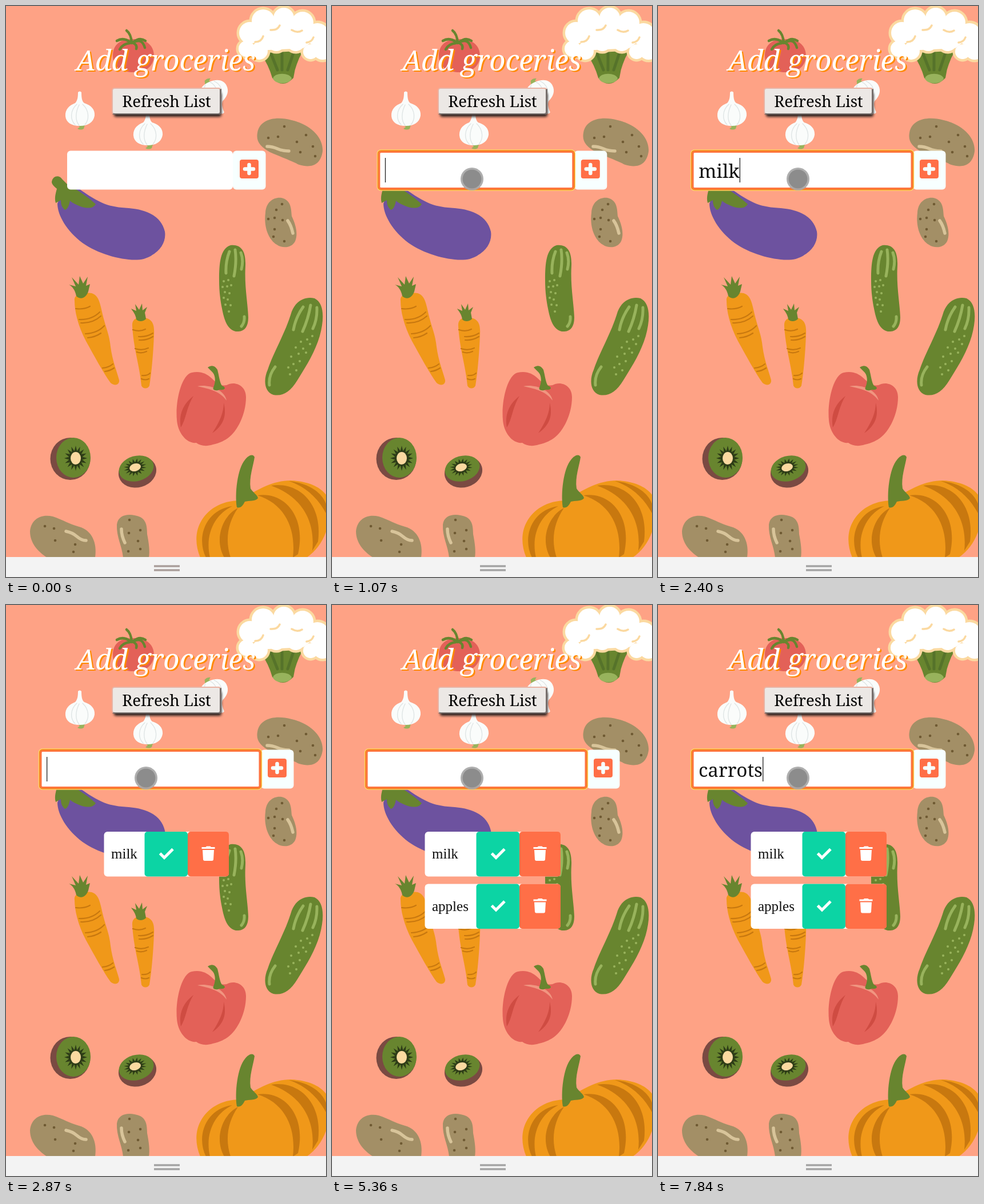
Recreate the animation shown at these times as an HTML page. Size 560 px wide and 1000 px high, loop 8 s.

```html
<!DOCTYPE html>
<html lang="en">
<head>
<meta charset="utf-8">
<title>Add groceries</title>
<style>
  html, body { margin: 0; width: 100%; height: 100%; overflow: hidden; background: #fea285; }
  svg { display: block; width: 100vw; height: 100vh; }
  .serif { font-family: "Noto Serif", serif; }
  .item { font: 25px "Liberation Serif", serif; }
  .green { fill: #68852f; }
  .lime { fill: #98b35c; }
  .orange { fill: #f09819; }
  .rust { fill: #c8780f; }
  .red { fill: #e36158; }
  .potato { fill: #a38f66; }
  .cream { fill: #fbd9a0; }
  .tomato { fill: #ff6f47; }
  .line { fill: none; stroke-linecap: round; stroke-linejoin: round; }
  .spots { stroke: #6f5a33; stroke-width: 4.5; }
  .shine { stroke: #d8c49a; stroke-width: 5.5; }
  .ridges { stroke: #c8780f; stroke-width: 2.2; }
  .stripes { stroke: #98b35c; stroke-width: 5; }
  .seeds { stroke: #98b35c; stroke-width: 4; }
</style>
</head>
<body>
<svg viewBox="0 0 560 1000" preserveAspectRatio="none">
  <defs>
    <g id="garlic">
      <path class="lime" d="M-4 20L10 18L7 28Q2 31-4 28L0 25Z"/>
      <path fill="#fafcfb" d="M-3-36Q0-39 3-36C3-26 4-20 8-17C20-13 27-6 26 5C24 17 14 23 0 23C-14 23-24 17-25 6C-26-6-18-13-8-17C-4-21-3-27-3-36Z"/>
      <path class="line" stroke="#dfe5e5" stroke-width="1.4" d="M-5-15C-17-4-17 12-8 21M5-15C17-4 17 12 9 21M-1-14C-8 0-8 14-1 22"/>
    </g>
    <g id="florets">
      <circle cx="427" cy="47" r="19"/><circle cx="421" cy="75" r="14"/><circle cx="443" cy="79" r="15"/>
      <circle cx="450" cy="26" r="20"/><circle cx="486" cy="21" r="18"/><circle cx="519" cy="29" r="19"/>
      <circle cx="545" cy="50" r="20"/><circle cx="554" cy="77" r="17"/><circle cx="533" cy="80" r="13"/>
      <circle cx="507" cy="63" r="16"/><circle cx="473" cy="63" r="16"/>
      <path d="M430 50L460 20L510 28L545 55L520 74L440 78Z"/>
    </g>
  </defs>

  <!-- Tomato -->
  <path class="red" d="M187 87C187 68 200 57 222 58C246 57 259 69 259 88C258 106 244 117 223 116C201 116 187 106 187 87Z"/>
  <path class="line" stroke="#68852f" stroke-width="4.500" d="M220 65Q219 49 211 43M218 64Q206 54 194 61M222 64Q238 55 243 73M217 65Q204 66 199 76M223 65Q230 68 228 75M223 63Q234 54 244 61"/>

  <!-- Cauliflower -->
  <path class="green" d="M444 80Q460 104 466 126Q484 146 503 126Q506 102 520 78L500 62H460Z"/>
  <path class="line" stroke="#56732a" stroke-width="5" d="M464 84L475 112M483 82V112M503 82L493 112"/>
  <path class="lime" d="M467 127C469 116 497 116 500 127C496 138 471 138 467 127Z"/>
  <use href="#florets" fill="#fbd9a0" stroke="#fbd9a0" stroke-width="9"/>
  <use href="#florets" fill="#fff"/>
  <path class="line" stroke="#fbd9a0" stroke-width="3.500" d="M436 63Q447 63 450 53M463 42Q475 43 479 34M500 42Q510 48 518 43M526 64Q535 63 538 55"/>

  <use href="#garlic" x="129" y="187"/>
  <use href="#garlic" x="248" y="221"/>
  <use href="#garlic" transform="translate(365 154) rotate(157)"/>

  <!-- Potatoes -->
  <g class="potato">
    <path d="M440 222C444 199 470 192 500 200C535 208 556 232 554 255C550 280 533 284 513 278C492 268 478 263 462 256C446 247 437 238 440 222Z"/>
    <path d="M454 362C455 342 470 334 482 336C498 340 499 352 500 368C508 385 511 400 506 412C500 424 484 425 474 418C458 408 451 385 454 362Z"/>
    <path d="M42 920C44 898 62 889 82 894C100 900 110 907 128 912C150 918 160 940 156 966H72C55 955 42 940 42 920Z"/>
    <path d="M194 908C196 892 212 889 225 892C243 895 247 905 247 925C250 940 252 955 250 966H205C203 945 193 930 194 908Z"/>
  </g>
  <path class="line shine" d="M457 246Q466 246 475 250T495 254M493 376Q499 384 502 398M105 920Q116 922 124 929T140 936M202 916Q202 928 208 940"/>
  <path class="line spots" d="M487 211h.1M476 229h.1M459 231h.1M509 238h.1M525 226h.1M515 256h.1M537 246h.1M541 263h.1M483 347h.1M473 357h.1M459 373h.1M470 371h.1M484 375h.1M470 391h.1M487 412h.1M468 404h.1M68 911h.1M84 915h.1M86 936h.1M121 943h.1M118 956h.1M216 900h.1M235 918h.1M215 923h.1M231 937h.1M235 951h.1M214 955h.1"/>

  <!-- Eggplant -->
  <path fill="#6d529f" d="M90 346C90 366 106 394 134 415C165 437 215 449 241 443C268 434 281 415 278 395C272 370 250 357 215 354C180 352 165 347 125 318L100 318Z"/>
  <path class="green" d="M80 308C82 296 94 296 98 303L107 312C125 322 140 332 157 347C153 354 145 355 133 352C122 348 115 344 112 341C110 350 108 356 103 357C97 352 96 346 96 340L87 345C84 335 88 325 89 320C84 316 80 312 80 308Z"/>

  <!-- Carrots -->
  <path class="orange" d="M120 516C118 505 135 500 150 503C162 507 164 518 169 540C174 562 181 575 183 597C186 620 193 637 198 655C199 664 190 666 183 660C170 642 154 612 140 587C126 560 120 535 120 516ZM221 560C220 548 230 544 242 546C256 548 260 557 259 575C258 605 255 640 251 665C248 671 240 671 237 665C234 630 223 600 221 560Z"/>
  <path class="green" d="M123 508C121 497 115 490 110 488L122 491L115 475L127 488L129 473L135 486L143 474L140 490L147 487L144 500C140 512 130 515 123 508ZM228 549C227 540 222 535 219 530L228 534L226 522L233 532L238 521L239 533L247 527L243 537L245 548C240 553 232 553 228 549Z"/>
  <path class="line ridges" d="M122 530Q136 532 147 526M128 549Q150 550 164 536M131 555Q152 556 166 543M139 574Q160 573 172 560M143 581Q156 580 166 573M169 634Q180 633 187 627M173 640Q182 639 189 634M222 567Q234 571 244 566M232 579Q246 580 257 573M233 585Q246 586 257 579M226 600Q238 604 249 599M229 606Q237 609 246 605M238 647Q247 648 252 643M237 653Q244 656 250 653"/>

  <!-- Cucumbers -->
  <path class="green" d="M373 480C373 450 375 425 393 419C412 417 420 430 419 455C417 490 423 520 424 545C424 565 415 571 402 570C385 566 381 545 377 525C374 508 373 495 373 480ZM500 535C508 515 525 508 540 512C556 520 558 545 549 578C541 605 527 628 512 652C498 676 485 684 468 681C452 676 450 655 458 637C470 602 488 575 500 535Z"/>
  <path class="line stripes" d="M391 430Q384 448 385 468M401 427Q404 448 399 473M411 432Q416 445 412 461M417 544Q418 554 412 561M520 527Q507 545 503 567M533 524Q529 548 519 570M544 528Q545 548 537 565M471 632Q459 647 461 664"/>
  <path class="line seeds" d="M381 482h.1M389 480h.1M379 492h.1M387 491h.1M394 489h.1M383 501h.1M391 503h.1M381 511h.1M388 514h.1M384 523h.1M393 524h.1M390 535h.1M536 578h.1M527 584h.1M516 588h.1M532 592h.1M507 598h.1M520 600h.1M512 609h.1M525 607h.1M499 614h.1M514 622h.1M503 627h.1M494 633h.1M508 638h.1M497 645h.1"/>

  <!-- Pepper -->
  <path class="red" d="M299 725C296 692 307 646 325 642C340 639 350 643 360 652C368 660 374 666 386 664C400 656 420 664 420 685C420 715 405 745 388 757C378 764 370 766 362 768C350 772 340 770 333 765C318 767 301 750 299 725Z"/>
  <path fill="#f19580" d="M335 666C352 662 382 670 386 691C375 676 360 671 335 666Z"/>
  <path fill="#cf4c42" d="M306 738C302 715 310 697 328 683C315 705 316 722 306 738ZM361 748C374 728 381 712 381 695C387 718 380 735 361 748Z"/>
  <path class="green" d="M353 633C360 628 366 630 370 637C373 648 374 660 378 665C386 668 384 673 374 672C366 675 361 672 363 668C368 656 366 645 360 640Z"/>

  <!-- Kiwis -->
  <g fill="#7a4a42">
    <ellipse cx="112.500" cy="793" rx="35" ry="37"/>
    <ellipse cx="230" cy="816" rx="33.500" ry="27" transform="rotate(-16 230 816)"/>
  </g>
  <g class="green">
    <ellipse cx="118" cy="791" rx="30" ry="35"/>
    <ellipse cx="228" cy="810" rx="31" ry="22" transform="rotate(-16 228 810)"/>
  </g>
  <g class="kiwi" transform="translate(122 792)"></g>
  <g class="kiwi" transform="translate(226 808) rotate(74) scale(.75 .92)"></g>

  <!-- Pumpkin -->
  <path class="orange" d="M340 966C331 945 331 922 340 905C352 882 376 866 410 866C440 846 468 831 498 831C528 832 550 842 560 856V921C553 940 542 955 526 966Z"/>
  <path class="rust" d="M350 966C332 930 350 882 396 876C368 889 347 922 357 966ZM382 966C364 935 378 893 406 879C388 905 383 935 393 966ZM440 857C488 850 526 895 511 960L502 966C508 915 488 872 440 857ZM464 840C512 832 555 872 546 938L536 954C542 900 515 858 464 840ZM495 832C528 835 555 852 561 875V890C546 862 525 842 495 832Z"/>
  <path class="green" d="M404 878C400 855 405 810 418 795C425 786 432 784 435 790C433 805 425 825 428 845C432 852 440 856 441 862C436 868 425 866 418 868C414 876 410 880 404 878Z"/>

  <rect y="965" width="560" height="35" fill="#f3f3f3"/>
  <path id="handle" stroke-width="3.500" d="M259 981H304M259 988H304"/>

  <!-- Header -->
  <g class="serif" text-anchor="middle">
    <g font-size="49.200" font-style="italic">
      <text x="282" y="115" fill="#ff8a00">Add groceries</text>
      <text x="279.500" y="112.500" fill="#fff">Add groceries</text>
    </g>
    <rect x="189" y="152" width="188" height="42" rx="4" fill="#2b2220" style="filter:blur(2.2px)"/>
    <rect x="185" y="143" width="192" height="47" rx="5" fill="#e9b3a4"/>
    <path fill="#776f6c" d="M377 145V186Q377 190 373 190H186L189 187H374V146Z"/>
    <rect x="187" y="145" width="187" height="43" rx="3" fill="#ece8e5"/>
    <text x="281" y="177" font-size="27.500">Refresh List</text>
  </g>

  <!-- Form -->
  <g id="add">
    <rect y="253.500" width="57.500" height="68" rx="6" fill="#f7ffff"/>
    <rect class="tomato" x="12" y="269" width="33" height="33" rx="4"/>
    <path class="line" stroke="#f7ffff" stroke-width="6.500" d="M28.500 278V293M21 285.500H36"/>
  </g>
  <rect id="field" y="253.500" height="68" rx="6" fill="#fff"/>
  <g id="focus" fill="none">
    <rect class="ring" data-inset="2" stroke="#ff7440" stroke-width="3"/>
    <rect class="ring" data-inset="-.300" stroke="#f58220" stroke-width="2.400"/>
    <rect class="ring" data-inset="-1.700" stroke="#ffd968" stroke-width="1.200"/>
    <text id="typed" class="serif" y="301" font-size="33.200" fill="#111"></text>
    <rect id="caret" y="266" width="1.300" height="43" fill="#222"/>
    <circle cx="245" cy="303" r="20" fill="#a8a8a8" fill-opacity=".92"/>
    <circle cx="245" cy="303" r="16.500" fill="#8c8c8c"/>
  </g>

  <g id="oneItem"></g>
  <g id="twoItems"></g>
</svg>

<script>
const $ = id => document.getElementById(id);
const LOOP = 8000, FOCUS = 920, GROW = 500;
const entries = [
  { word: 'milk', keys: [1850, 2030, 2210, 2400], enter: 2870 },
  { word: 'apples', keys: [3420, 3720, 3890, 4200, 4400, 4590], enter: 5360 },
  { word: 'carrots', keys: [6290, 6600, 6910, 7060, 7210, 7530, 7840], enter: LOOP }
];
const allKeys = entries.flatMap(e => e.keys);

function kiwiCore() {
  const points = Array.from({ length: 32 }, (_, i) => {
    const r = i % 2 ? 13 : 22, a = i * Math.PI / 16;
    return [r * .92 * Math.cos(a), r * Math.sin(a)].map(v => v.toFixed(1));
  });
  return `<polygon points="${points.join(' ')}" fill="#2e3d17"/><ellipse class="cream" rx="9" ry="11"/>`;
}

function itemRow(x, y, labelWidth, label) {
  return `<g transform="translate(${x} ${y})">
    <rect width="${labelWidth + 147.5}" height="78.500" rx="6" fill="#fff"/>
    <text class="item" x="12.500" y="47" fill="#111">${label}</text>
    <g transform="translate(${labelWidth} 0)">
      <rect width="75.500" height="78.500" rx="5" fill="#0cd4a4"/>
      <path fill="none" stroke="#fff" stroke-width="5" d="M27 38L34.500 45.500L49.500 30.500"/>
      <rect class="tomato" x="75.500" width="72" height="78.500" rx="5"/>
      <path fill="#fff" d="M100 27H107L108.500 25.500H115L116.500 27H123V30H100ZM101.500 32H121.500L120.500 49Q120 51 118 51H105Q103 51 102.500 49Z"/>
    </g>
  </g>`;
}

document.querySelectorAll('.kiwi').forEach(g => g.innerHTML = kiwiCore());
$('oneItem').innerHTML = itemRow(171.5, 397, 71, 'milk');
$('twoItems').innerHTML = itemRow(162.5, 397, 90, 'milk') + itemRow(162.5, 488.5, 90, 'apples');

const show = (id, on) => $(id).setAttribute('visibility', on ? 'visible' : 'hidden');
const mix = (a, b, p) => a + (b - a) * p;

function setAttrs(el, attrs) {
  for (const name in attrs) el.setAttribute(name, attrs[name]);
}

function render(t) {
  const u = Math.min(1, Math.max(0, (t - FOCUS) / GROW));
  const p = 1 - (1 - u) ** 2.2;
  const left = mix(107, 59, p), right = mix(397, 446, p);
  setAttrs($('field'), { x: left, width: right - left });
  $('add').setAttribute('transform', `translate(${right} 0)`);
  document.querySelectorAll('.ring').forEach(ring => {
    const d = +ring.dataset.inset;
    setAttrs(ring, { x: left + d, y: 253.5 + d, width: right - left - 2 * d, height: 68 - 2 * d, rx: 5 - d });
  });

  const entry = entries.find(e => t < e.enter) || entries[2];
  const typed = $('typed');
  typed.textContent = entry.word.slice(0, entry.keys.filter(k => k <= t).length);
  typed.setAttribute('x', left + 12);
  $('caret').setAttribute('x', left + 12 + (typed.textContent ? typed.getComputedTextLength() : 0));

  const lastKey = allKeys.filter(k => k <= t).pop() || FOCUS - 10;
  const focused = t >= FOCUS;
  show('focus', focused);
  show('caret', focused && (t - lastKey) % 1000 < 535);
  show('oneItem', t >= entries[0].enter && t < entries[1].enter);
  show('twoItems', t >= entries[1].enter);
  $('handle').setAttribute('stroke', t < 70 ? '#aa9e9b' : '#a4a4a4');
}

const start = performance.now();
function tick(now) {
  render(Math.max(0, now - start) % LOOP);
  requestAnimationFrame(tick);
}
render(0);
requestAnimationFrame(tick);
</script>
</body>
</html>
```
